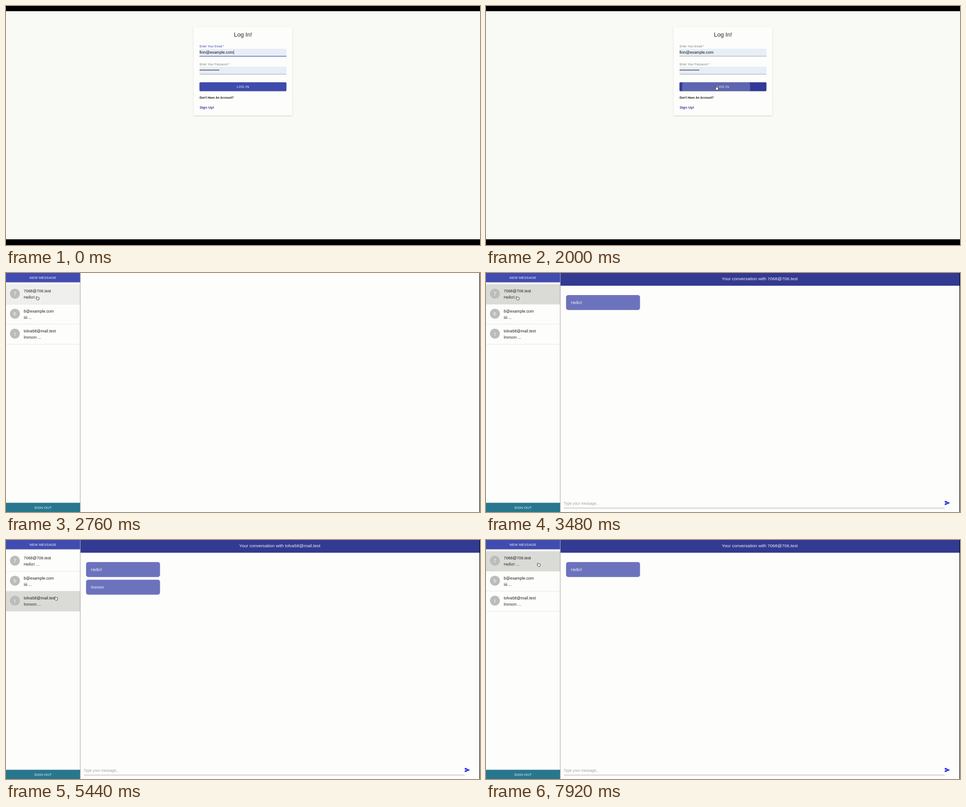
An HTML page with a canvas that plays this animation: 1054 px wide and 531 px high, repeating every 8 s.

```html
<!DOCTYPE html>
<html lang="en">
<head>
<meta charset="utf-8">
<title>Chat login</title>
<style>
  html, body { margin: 0; width: 100%; height: 100%; overflow: hidden; background: #000; }
  canvas { display: block; width: 1054px; height: 531px; }
</style>
</head>
<body>
<canvas id="stage"></canvas>
<script>
const W = 1054, H = 531, LOOP = 8000;
const PAGE_TOP = 11.5, PAGE_HEIGHT = 506.8;
const FONT = '"Liberation Sans", Arial, sans-serif';
const canvas = document.getElementById('stage');
const ctx = canvas.getContext('2d');
const dpr = window.devicePixelRatio || 1;
canvas.width = W * dpr;
canvas.height = H * dpr;

// Moments of the story, in ms
const PRESS = 1800, LOADING = 2240, DASHBOARD = 2400, FULL = 2760;

const chats = [
  { email: '7068@706.test', last: 'Hello!! ...', messages: [{ lines: ['Hello!!'] }] },
  { email: 'b@example.com', last: 'iiii ...', messages: [
    { lines: ['HEy man'] },
    { lines: ['Hey! Just got your message. How', 'are you'], mine: true },
    { lines: ['iiii'] }
  ] },
  { email: 'tolva58@mail.test', last: 'lmmom ...', messages: [{ lines: ['Hello!!'] }, { lines: ['lmmom'] }] }
];
const clicks = [[3360, 0], [4360, 1], [5280, 2], [7760, 0]];

// Pointer tip: time, x, y
const route = [
  [200, 60, 205], [640, 330, 190], [1000, 500, 180], [1300, 500, 180], [1600, 510, 179],
  [2759, 510, 179], [2760, 67, 52], [3880, 67, 52], [4240, 103, 80], [4720, 103, 80],
  [5080, 108, 126], [5760, 108, 126], [6280, 336.5, 305], [6360, 336.5, 305], [6520, 390, 388],
  [6640, 390, 388], [6880, 530, 472], [7400, 150, 112], [7480, 150, 112], [7720, 114, 51], [8000, 114, 51]
];

const sendIcon = new Path2D('M2 21L23 12 2 3 2 10l15 2-15 2z');
const handIcon = new Path2D('M1.2 4.5L.2 1.2Q.6-.4 1.7.5L2.6 2Q5 1.2 6.7 2.6Q7.2 4.8 6 7.7L2.4 7.9L-.7 4.9Q-.5 3.8 1.2 4.5Z');
const arrowIcon = new Path2D('M0 0L0 7L1.6 5.6L2.8 8.3L4 7.8L2.8 5.1L4.9 5Z');

const clamp = v => Math.max(0, Math.min(1, v));
const smooth = v => { v = clamp(v); return v * v * (3 - 2 * v); };
const mix = (a, b, k) => a + (b - a) * k;

function rect(x, y, w, h, color) {
  ctx.fillStyle = color;
  ctx.fillRect(x, y, w, h);
}

function roundRect(x, y, w, h, r, color) {
  ctx.beginPath();
  ctx.roundRect(x, y, w, h, r);
  ctx.fillStyle = color;
  ctx.fill();
}

function shadowed(blur, dy, alpha, draw) {
  ctx.save();
  ctx.shadowColor = `rgba(0,0,0,${alpha})`;
  ctx.shadowBlur = blur * dpr;
  ctx.shadowOffsetY = dy * dpr;
  draw();
  ctx.restore();
}

function text(str, x, y, size, color, { align = 'left', weight = 400, spacing = 0 } = {}) {
  ctx.font = `${weight} ${size}px ${FONT}`;
  ctx.textAlign = align;
  ctx.letterSpacing = spacing + 'px';
  ctx.fillStyle = color;
  ctx.fillText(str, x, y);
}

function pointerAt(t) {
  if (t < route[0][0]) return null;
  const i = route.findIndex(p => p[0] > t);
  const [t0, x0, y0] = route[i - 1], [t1, x1, y1] = route[i];
  const k = smooth((t - t0) / (t1 - t0));
  return { x: mix(x0, x1, k), y: mix(y0, y1, k) };
}

function drawPointer({ x, y }, hand) {
  ctx.save();
  ctx.translate(x, y);
  ctx.lineJoin = 'round';
  if (hand) {
    ctx.fillStyle = '#fff';
    ctx.fill(handIcon);
    ctx.strokeStyle = '#222';
    ctx.lineWidth = .9;
    ctx.stroke(handIcon);
  } else {
    ctx.strokeStyle = '#fff';
    ctx.lineWidth = 1.2;
    ctx.stroke(arrowIcon);
    ctx.fillStyle = '#111';
    ctx.fill(arrowIcon);
  }
  ctx.restore();
}

function field(label, y, focus) {
  text(label + '\u2009*', 430.5, y - 3, 6.58, focus ? '#3f4bb0' : '#808080', { spacing: .06 });
  rect(430.3, y, 193.2, 16.6, '#e7eef6');
  rect(430.3, y + 16.2, 193.2, .8, '#888a90');
  if (focus) rect(430.3, y + 16, 193.2, 1.2, '#3648ae');
}

function drawButton(t, hover) {
  const x = 430.3, y = 169.5, w = 193.2, h = 19.5;
  const c = [[62, 48], [74, 58], [174, 155]].map(([a, b]) => Math.round(mix(a, b, hover)));
  shadowed(2, .8, .3, () => roundRect(x, y, w, h, 2, `rgb(${c})`));
  if (t > PRESS) {
    ctx.save();
    ctx.beginPath();
    ctx.roundRect(x, y, w, h, 2);
    ctx.clip();
    ctx.beginPath();
    ctx.arc(511.7, 182, 113 * smooth((t - PRESS) / 327), 0, 7);
    ctx.fillStyle = `rgba(255,255,255,${.22 * (1 - smooth((t - 2040) / 300))})`;
    ctx.fill();
    ctx.restore();
  }
  text('LOG IN', 527, 182.1, 7.69, '#f4f4fb', { align: 'center', spacing: .22 });
}

function drawLogin(t, pointer) {
  const focus = t < PRESS;
  rect(0, PAGE_TOP, W, PAGE_HEIGHT, '#f9faf6');
  shadowed(2, .7, .25, () => roundRect(417, 46.7, 219.8, 196.8, 2.2, '#fdfdfb'));
  text('Log In!', 527, 68.3, 13.2, '#252525', { align: 'center' });
  field('Enter Your Email', 95, focus);
  text('finn@example.com', 430.3, 106, 8.8, '#111');
  if (focus && t % 1000 < 500) {
    ctx.font = `8.8px ${FONT}`;
    rect(430.6 + ctx.measureText('finn@example.com').width, 98, .7, 10, '#222');
  }
  field('Enter Your Password', 134.8, false);
  for (let i = 0; i < 14; i++) {
    ctx.beginPath();
    ctx.arc(432 + i * 3.13, 142.4, 1.15, 0, 7);
    ctx.fillStyle = '#222';
    ctx.fill();
  }
  drawButton(t, smooth((t - 900) / 250));
  text("Don't Have An Account?", 430.4, 206.4, 6.5, '#222', { weight: 700 });
  text('Sign Up!', 430.4, 227.8, 7.9, '#303b98', { weight: 700 });
  if (pointer) drawPointer(pointer, pointer.x > 430 && pointer.y > 169 && pointer.y < 189);
}

function drawRow(chat, i, selected, hover) {
  const y = 25 + i * 44.4;
  if (selected || hover) rect(0, y, 165, 44.4, selected ? '#dadad7' : '#efefed');
  rect(0, y + 44, 165, .7, '#deded8');
  ctx.beginPath();
  ctx.arc(19.8, y + 21, 11, 0, 7);
  ctx.fillStyle = '#bcbcbb';
  ctx.fill();
  text(chat.email[0], 19.8, y + 24.9, 11, '#fafafa', { align: 'center' });
  text(chat.email, 39.5, y + 18.3, 8.78, '#1c1c1c', { spacing: .08 });
  text(chat.last, 39.5, y + 32.1, 8.7, '#2c2c2c', { spacing: .06 });
}

function drawConversation(chat) {
  rect(165.5, 0, 887.5, 28.3, '#333a91');
  text('Your conversation with ' + chat.email, 608.7, 15.6, 9.88, '#f1f1f8', { align: 'center' });
  rect(1044.8, 28.3, .7, 474, '#f0f0e8');
  let y = 49;
  for (const { lines, mine } of chat.messages) {
    const x = mine ? 866 : 178, h = 23 + lines.length * 10.2;
    roundRect(x, y, 164.5, h, 5, '#6c73bd');
    lines.forEach((line, i) => text(line, x + 11, y + 20 + i * 10.2, 8.75, '#f2f2fa'));
    y += h + 6.1;
  }
  text('Type your message..', 172.7, 515.3, 8.3, '#a3a3a3');
  rect(173, 521.8, 847, .8, '#8c8c8c');
  ctx.save();
  ctx.translate(1019.2, 504.3);
  ctx.scale(.549, .549);
  ctx.fillStyle = '#1010dc';
  ctx.fill(sendIcon);
  ctx.restore();
}

function drawDashboard(t, pointer) {
  const full = t >= FULL;
  const height = full ? H : PAGE_HEIGHT;
  const click = clicks.filter(c => c[0] <= t).pop();
  const selected = click ? click[1] : -1;
  const over = pointer.x < 165 && pointer.y >= 25 ? Math.floor((pointer.y - 25) / 44.4) : -1;
  ctx.save();
  if (!full) ctx.translate(0, PAGE_TOP);
  rect(0, 0, W, height, '#fdfdfb');
  chats.forEach((chat, i) => drawRow(chat, i, i === selected, i === over));
  shadowed(2.5, .8, .3, () => rect(0, 0, 165, 20.5, '#414cb0'));
  text('NEW MESSAGE', 82.2, 13.2, 7.6, '#f2f2fb', { align: 'center', spacing: .22 });
  rect(0, height - 20.5, 165, 20.5, '#28778e');
  text('SIGN OUT', 82.2, height - 7.2, 7.69, '#f2f7f8', { align: 'center', spacing: .22 });
  if (selected >= 0) drawConversation(chats[selected]);
  rect(164.6, 0, .9, height, '#8f8f94');
  if (full) rect(1052.8, 0, 1.2, H, '#000');
  ctx.restore();
  drawPointer(pointer, over >= 0 && over < chats.length);
}

function drawLoading(pointer) {
  rect(0, PAGE_TOP, W, PAGE_HEIGHT, '#fdfdfb');
  text('LOADING....', 0, 19.9, 8.4, '#1a1a1a');
  drawPointer(pointer, true);
}

function frame(now) {
  const t = (now - start + LOOP) % LOOP;
  const pointer = pointerAt(t);
  ctx.setTransform(dpr, 0, 0, dpr, 0, 0);
  rect(0, 0, W, H, '#000');
  if (t < LOADING) drawLogin(t, pointer);
  else if (t < DASHBOARD) drawLoading(pointer);
  else drawDashboard(t, pointer);
  requestAnimationFrame(frame);
}

const start = performance.now();
frame(start);
</script>
</body>
</html>
```
